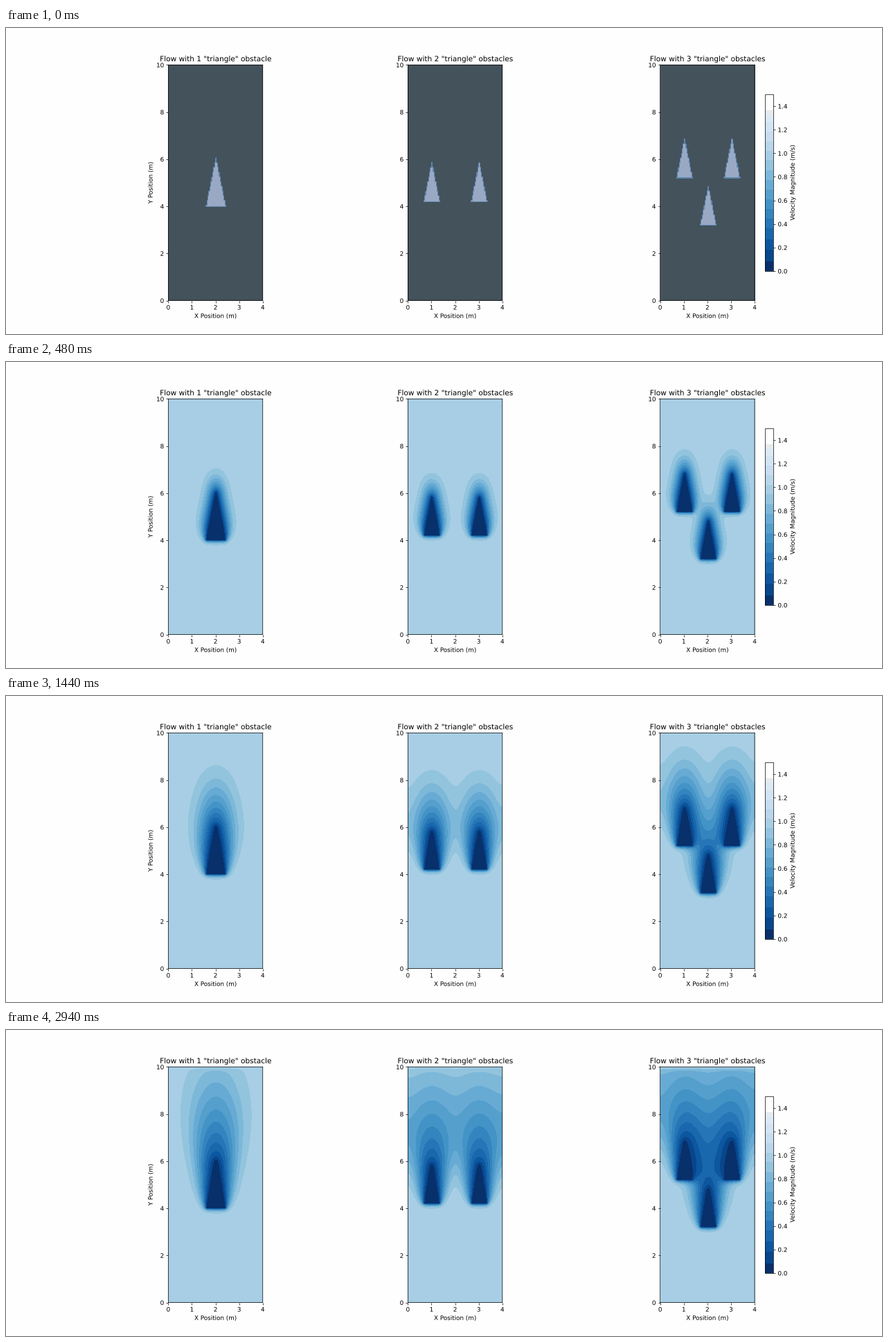
These frames come from a looping animation (1265 by 443 pixels, 3000 ms). A matplotlib script:

```python
import numpy as np
import matplotlib.pyplot as plt
from matplotlib.animation import FuncAnimation
from matplotlib.cm import ScalarMappable
from matplotlib.colors import BoundaryNorm, ListedColormap
from matplotlib.patheffects import Normal
from matplotlib.text import Text

WIDTH, HEIGHT, DPI = 1265, 443, 63.25
FRAMES, INTERVAL = 50, 60
VISCOSITY = 0.05
DT, STEPS_PER_FRAME = 0.005, 20
V_MAX = 1.5
DX, DY = 0.04, 0.05

plt.rcParams.update({"font.family": "DejaVu Sans", "text.hinting": "none"})

X, Y = np.meshgrid(np.arange(100) * DX, np.arange(200) * DY)

# Each panel: half height of its triangles and their centres
PANELS = [
    (1.0, [(2, 5)]),
    (0.8, [(1, 5), (3, 5)]),
    (0.8, [(1, 6), (3, 6), (2, 4)]),
]


def triangle_mask(half_height, centres):
    mask = np.zeros_like(X, dtype=bool)
    for cx, cy in centres:
        half_width = 0.2 * (cy + half_height - Y)
        inside = np.abs(X - cx) <= half_width + 1e-9
        mask |= inside & (Y >= cy - half_height - 1e-9)
    return mask


def step(v, mask):
    """Advance the viscous Burgers equation for the upward velocity (upwind)."""
    wide = np.pad(v, ((0, 0), (1, 1)), mode="edge")
    mid = v[1:-1]
    d_y = (mid - v[:-2]) / DY
    d_yy = (v[2:] - 2 * mid + v[:-2]) / DY**2
    d_xx = (wide[1:-1, 2:] - 2 * mid + wide[1:-1, :-2]) / DX**2
    new = v.copy()
    new[1:-1] += DT * (VISCOSITY * (d_xx + d_yy) - mid * d_y)
    new[mask] = 0
    return new


def simulate(mask):
    v = np.where(mask, 0.0, 1.0)
    history = [v]
    for _ in range(FRAMES - 1):
        for _ in range(STEPS_PER_FRAME):
            v = step(v, mask)
        history.append(v)
    return history


flows = [simulate(triangle_mask(*panel)) for panel in PANELS]

# Band edges as heights on the 256 unit colour scale
edges = np.array([0, 14, 31, 46, 62, 76, 90, 104, 118, 132, 146, 161,
                  174, 188, 202, 216, 226, 233, 256])
levels = edges / 256 * V_MAX
middles = (levels[1:] + levels[:-1]) / 2
blues = plt.get_cmap("Blues_r")
colors = blues(middles / V_MAX)
colors[0] = blues(0.0)
colors[-2] = (0.90, 0.92, 0.935, 1)
colors[-1] = (1, 1, 1, 1)
flow_style = dict(cmap=ListedColormap(colors),
                  norm=BoundaryNorm(levels, len(colors)))
start_style = dict(cmap=ListedColormap(["#9aa9c3", "#5c86ae", "#44525b"]),
                   norm=BoundaryNorm([-0.1, 0.1, 0.9, 1.1], 3))

# A quarter pixel of offset puts the frame lines on the pixel grid
shift_x, shift_y = 0.25 / WIDTH, -0.3 / HEIGHT
fig, axes = plt.subplots(
    1, 3, figsize=((WIDTH + 0.01) / DPI, (HEIGHT + 0.01) / DPI), dpi=DPI,
    facecolor="#fefefe",
    gridspec_kw=dict(left=0.125 + shift_x, right=0.9 + shift_x,
                     bottom=0.11 + shift_y, top=0.88 + shift_y))

images = []
for count, (ax, flow) in enumerate(zip(axes, flows), 1):
    plural = "s" if count > 1 else ""
    images.append(ax.imshow(flow[0], origin="lower", extent=(0, 4, 0, 10),
                            interpolation="bilinear", **start_style))
    ax.set_title(f'Flow with {count} "triangle" obstacle{plural}')
    ax.set_xlabel("X Position (m)")
    ax.set(xticks=range(5), yticks=range(0, 11, 2))
    for spine in ax.spines.values():
        spine.set_snap(False)
axes[0].set_ylabel("Y Position (m)")

bar = fig.colorbar(
    ScalarMappable(**flow_style), ax=axes[2], shrink=0.75,
    spacing="proportional", ticks=np.arange(0, V_MAX, 0.2), format="%.1f",
    label="Velocity Magnitude (m/s)")
bar.minorticks_off()

# Text drawn as outlines keeps its fractional pixel position
fig.draw_without_rendering()
for text in fig.findobj(Text):
    text.set_path_effects([Normal()])


def draw(frame):
    style = flow_style if frame else start_style
    for image, flow in zip(images, flows):
        image.set(data=np.clip(flow[frame], 0, 1.02), **style)
    return images


animation = FuncAnimation(fig, draw, frames=FRAMES, interval=INTERVAL,
                          repeat=True, repeat_delay=0, blit=False)
plt.show()
```
